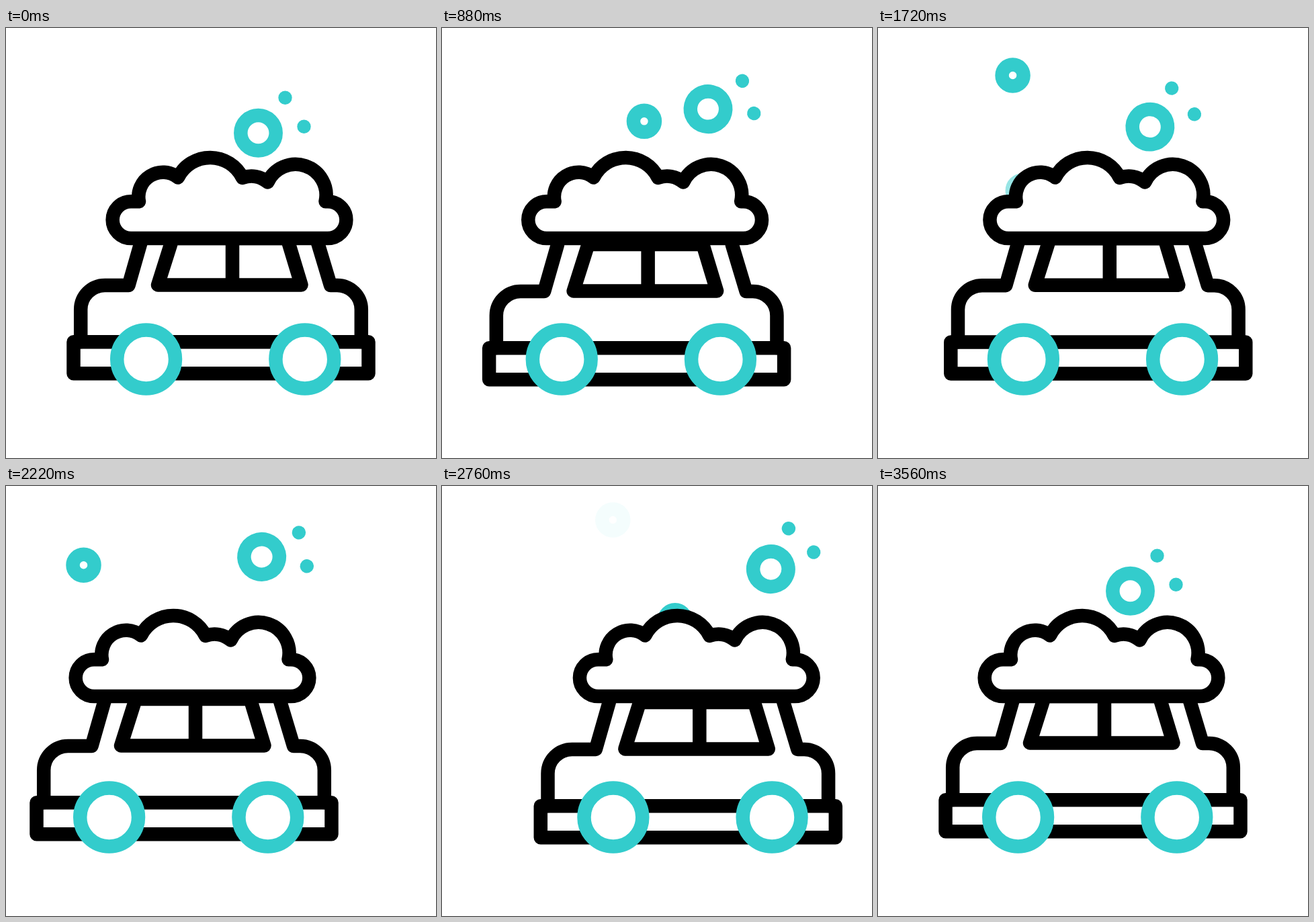
Animation of 640 by 640 pixels, one loop 3.6 s. Source, as an HTML page:

```html
<!DOCTYPE html>
<html lang="en">
<head>
<meta charset="utf-8">
<title>Car wash</title>
<style>
  html, body { margin: 0; width: 100%; height: 100%; overflow: hidden; background: #fff; }
  svg { display: block; width: 100vw; height: 100vh; }
  .line { fill: none; stroke: #000; stroke-width: 20.5; stroke-linecap: round; stroke-linejoin: round; }
  .ring { fill: none; stroke: #3cc; stroke-width: 20.5; }
  .dot { fill: #3cc; }
  .solid { fill: #fff; }
</style>
</head>
<body>
<svg viewBox="0 0 640 640">
  <g id="car">
    <g id="foam">
      <circle class="ring" r="26.2"/>
      <circle class="dot" cx="40" cy="-52.5" r="10.2"/>
      <circle class="dot" cx="68" cy="-9.5" r="10.2"/>
    </g>
    <g id="bubbles"></g>
    <g id="body" class="line">
      <path d="M111.2 467V419a36 36 0 0 1 36-36H182.5L202.5 313"/>
      <path d="M528.8 467V419a36 36 0 0 0-36-36H483L462 313"/>
      <path d="M226 382.5H439.5L418.5 313H248ZM337 313V382"/>
      <path d="M100.5 467.3H539.5V514.3H100.5Z"/>
    </g>
    <circle class="ring solid" cx="208.6" cy="493" r="43.4"/>
    <circle class="ring solid" cx="444.8" cy="493" r="43.4"/>
    <path class="line solid" d="M186 313H479a27.4 27.4 0 0 0 0-54.8H475.5
      A45.6 45.6 0 0 0 389.5 229.5A37 37 0 0 0 352 223A53.5 53.5 0 0 0 256 222.5
      A36.3 36.3 0 0 0 198 258.2H186a27.4 27.4 0 0 0 0 54.8Z"/>
  </g>
</svg>
<script>
const LOOP = 3600, FOAM_LAG = 57, BUBBLE_BASE = 246;
const turns = [0, 620, 1403, 2117, 2903, 3505];

// Eased progress from 0 to 1 between two times.
function ramp(t, from, to) {
  const u = Math.min(1, Math.max(0, (t - from) / (to - from)));
  return u * u * (3 - 2 * u);
}

// Swings from rest through four extremes and back to rest.
function sway(t, a, b, c = a, d = b) {
  const stops = [0, a, b, c, d, 0];
  return turns.slice(1).reduce((sum, turn, i) =>
    sum + (stops[i + 1] - stops[i]) * ramp(t, turns[i], turn), 0);
}

// Sideways drift of a bubble over its rise p.
const leftArc = p => 208 - 37.5 * Math.sin(Math.PI * p ** 1.65) ** 2;
const rightArc = p => 268 + 69.5 * Math.sin(0.6 * Math.PI * p);

const bubbles = [
  { arc: rightArc, start: 308, arrive: 1308, gone: 1375, top: 69.5 },
  { arc: leftArc, start: 825, arrive: 1995, gone: 2030, top: 42 },
  { arc: leftArc, start: 1640, arrive: 2598, gone: 2785, top: 50.5 },
  { arc: rightArc, start: 2427, arrive: 3427, gone: 3550, top: 69.5 }
];

const byId = id => document.getElementById(id);
const move = (el, x, y, angle = 0) =>
  el.setAttribute('transform', `translate(${x} ${y}) rotate(${angle})`);

for (const bubble of bubbles) {
  bubble.el = document.createElementNS('http://www.w3.org/2000/svg', 'circle');
  bubble.el.setAttribute('class', 'ring');
  bubble.el.setAttribute('r', 16);
  byId('bubbles').append(bubble.el);
}

function draw(now) {
  const t = now % LOOP, late = t - FOAM_LAG;
  move(byId('car'), sway(t, -60.5, 56.5), 0);
  move(byId('body'), 0, 9 * Math.sin(2 * Math.PI * t / LOOP) ** 2);
  move(byId('foam'),
    375.5 + sway(late, 60, 5, 60, 69),
    156.2 + sway(late, -44.5, 9, -51, -29),
    sway(late, 20, -20));
  for (const { el, arc, start, arrive, gone, top } of bubbles) {
    const p = ramp(t, start, arrive);
    move(el, arc(p), BUBBLE_BASE + (top - BUBBLE_BASE) * p);
    el.setAttribute('opacity', ramp(t, start + 55, start + 105) * (1 - ramp(t, gone - 180, gone)));
  }
}

let begin;
function tick(now) {
  begin ??= now;
  draw(now - begin);
  requestAnimationFrame(tick);
}
draw(0);
requestAnimationFrame(tick);
</script>
</body>
</html>
```
